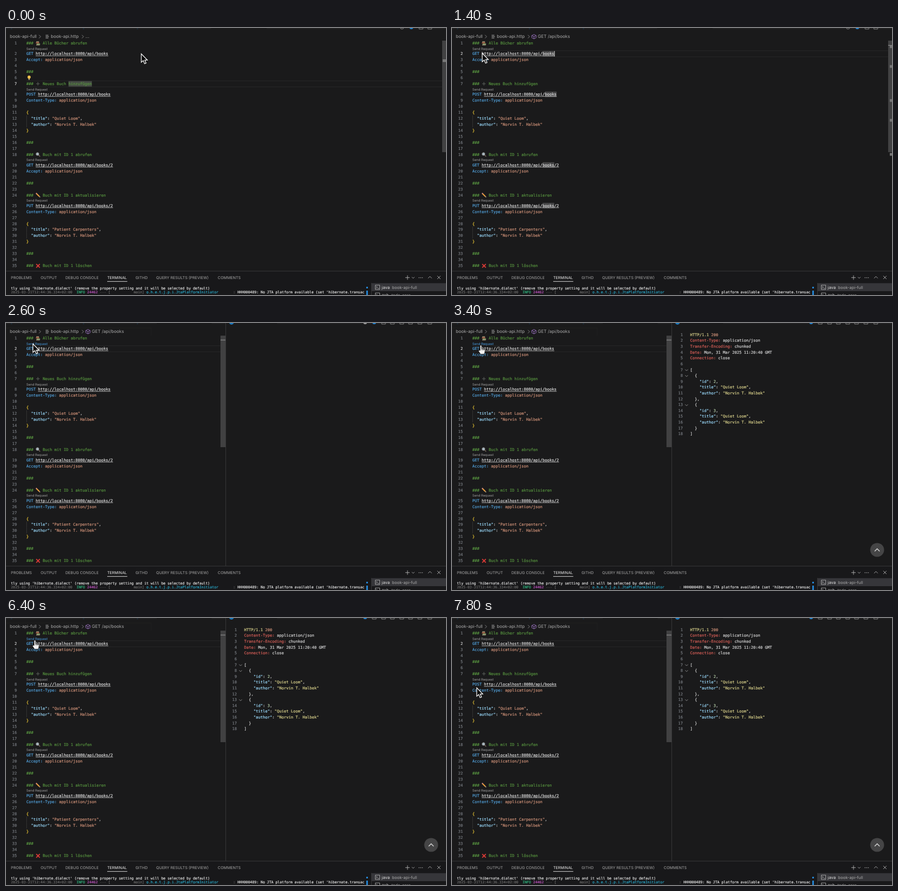
An HTML page for the animation above (8000 ms loop, 800 px wide and 486 px high).

```html
<!DOCTYPE html>
<html lang="de">
<head>
<meta charset="utf-8">
<title>REST client session</title>
<style>
  html, body { margin: 0; width: 100%; height: 100%; overflow: hidden; background: #1a1a1b; }
  svg { display: block; width: 100vw; height: 100vh; }
  text { white-space: pre; text-rendering: geometricPrecision; stroke-width: 0.2px; }
  .mono { font-family: "DejaVu Sans Mono", monospace; font-size: 7.07px; }
  .term { font-family: "DejaVu Sans Mono", monospace; font-size: 6.4px; }
  .ui { font-family: Inter, sans-serif; }
</style>
</head>
<body>
<svg id="stage" viewBox="0 0 800 486"></svg>
<script>
const LOOP = 8000, STEP = 200;
const CLICK = 400, HOVER = 2000, SPLIT = 2600, RESPONSE = 3000, LEAVE = 6800;
const CHAR = 4.257, LEFT = 37;
const C = {
  comment: '#56923f', blue: '#519fd8', url: '#dcdcdc', string: '#ce9178', key: '#9cdcfe',
  brace: '#f5cf35', plain: '#d4d4d4', dim: '#777b80', header: '#d75f58', reply: '#d8d08a', number: '#b5cea8'
};
const stage = document.getElementById('stage');

function add(parent, name, attrs = {}, content) {
  const el = document.createElementNS('http://www.w3.org/2000/svg', name);
  for (const key in attrs) el.setAttribute(key, attrs[key]);
  if (content !== undefined) el.textContent = content;
  parent.append(el);
  return el;
}
const group = (parent = stage) => add(parent, 'g');
const rect = (parent, x, y, width, height, fill) => add(parent, 'rect', { x, y, width, height, fill });
const line = (parent, d, stroke = '#c5c5c5', width = 0.8) =>
  add(parent, 'path', { d, stroke, 'stroke-width': width, fill: 'none' });
const dot = (parent, cx, cy, r, fill) => add(parent, 'circle', { cx, cy, r, fill });
const label = (parent, x, y, size, fill, content) =>
  add(parent, 'text', { x, y: y + size * 0.36, class: 'ui', 'font-size': size, fill }, content);

// Text on a fixed grid, from [colour, string] pieces; y is the middle of the capitals.
// The thin stroke gives the glyphs their slightly heavy look.
function rich(parent, x, y, pieces, cls = 'mono', anchor = 'start') {
  const el = add(parent, 'text', { x, y: y + 2.6, class: cls, 'text-anchor': anchor });
  for (const [fill, part] of pieces) add(el, 'tspan', { fill, stroke: fill }, part);
  return el;
}

function colourJson(source, stringColour, braceColour) {
  const pair = source.match(/^(\s*)("\w+")(: )(\d+|".*?")(,?)$/);
  if (!pair) return [[braceColour, source]];
  const [, indent, key, colon, value, comma] = pair;
  return [[C.plain, indent], [C.key, key], [C.plain, colon],
    [value[0] === '"' ? stringColour : C.number, value], [C.plain, comma]];
}

function colourRequest(source) {
  if (source.startsWith('#')) return [[C.comment, source]];
  const verb = source.match(/^([A-Z]+ )(http.*)$/);
  if (verb) return [[C.blue, verb[1]], [C.url, verb[2]]];
  const header = source.match(/^([\w-]+:)( .*)$/);
  if (header) return [[C.blue, header[1]], [C.string, header[2]]];
  return colourJson(source, C.string, C.brace);
}

const requests = `###    Alle Bücher abrufen
GET http://localhost:8080/api/books
Accept: application/json

###

###    Neues Buch hinzufügen
POST http://localhost:8080/api/books
Content-Type: application/json

{
  "title": "Quiet Loom",
  "author": "Norvin T. Halbek"
}

###

###    Buch mit ID 1 abrufen
GET http://localhost:8080/api/books/2
Accept: application/json

###

###    Buch mit ID 1 aktualisieren
PUT http://localhost:8080/api/books/2
Content-Type: application/json

{
  "title": "Patient Carpenters",
  "author": "Norvin T. Halbek"
}

###

###    Buch mit ID 1 löschen`.split('\n');

const reply = `HTTP/1.1 200
Content-Type: application/json
Transfer-Encoding: chunked
Date: Mon, 31 Mar 2025 11:20:40 GMT
Connection: close

[
  {
    "id": 2,
    "title": "Quiet Loom",
    "author": "Norvin T. Halbek"
  },
  {
    "id": 3,
    "title": "Quiet Loom",
    "author": "Norvin T. Halbek"
  }
]`.split('\n');

// Small pictures in an 8 by 8 box.
const icons = {
  1(g) {
    rect(g, 1, 0.5, 5, 2, '#8f8064'); rect(g, 0.5, 2.7, 6, 2, '#b5654a');
    rect(g, 2, 4.7, 6, 1.6, '#6c9a62'); rect(g, 1, 6.3, 6.5, 1.5, '#b9ad8e');
  },
  7(g) { line(g, 'M4 1V7M1 4H7', '#4c4f4c', 1.5); },
  18(g) {
    line(g, 'M5 5L8 8', '#77685c', 1.4);
    add(g, 'circle', { cx: 3.3, cy: 3.3, r: 2.6, fill: '#a9bac2', stroke: '#858585' });
  },
  24(g) {
    line(g, 'M1.5 1.5L6.5 6.5', '#e39a3b', 2.2);
    line(g, 'M.6 .6L1.8 1.8', '#d98d8d', 2); line(g, 'M6.5 6.5L8 8', '#d8c39c', 1.2);
  },
  35(g) { line(g, 'M1 1L7.5 7.5M7.5 1L1 7.5', '#dc3b36', 1.8); }
};

// Editor
const before = group(), after = group(), editor = group();
const lineY = [], numbers = [], lenses = [];
let y = 27.6;
requests.forEach((source, i) => {
  const n = i + 1;
  if (/^(GET|POST|PUT)/.test(source)) {
    y += 8.17;
    lenses.push(label(editor, LEFT, y - 8.9, 5.9, '#a2a2a2', 'Send Request'));
    const start = LEFT + (source.indexOf(' ') + 1) * CHAR;
    line(editor, `M${start} ${y + 4}H${LEFT + source.length * CHAR}`, '#c8c8c8', 0.8);
  }
  lineY[n] = y;
  numbers[n] = rich(editor, 19.8, y, [[C.dim, String(n)]], 'mono', 'end');
  rich(editor, LEFT, y, colourRequest(source));
  if (source.startsWith('  ')) line(editor, `M37.5 ${y - 5.5}v11`, '#444', 0.6);
  if (icons[n]) icons[n](add(editor, 'g', { transform: `translate(54 ${y - 4})` }));
  y += 10.95;
});

const activeLine = (g, n) => line(g, `M37 ${lineY[n] - 5.3}H793M37 ${lineY[n] + 5.7}H793`, '#272728', 1);
activeLine(before, 7);
rect(before, LEFT + 18 * CHAR, lineY[7] - 4.8, 10 * CHAR, 10, '#454a44');
dot(before, 42, lineY[6] - 1.1, 2.8, '#f3c34b');
rect(before, 40.9, lineY[6] + 1.7, 2.2, 2.2, '#c9b68a');
activeLine(after, 2);
const matches = group(after);
for (const n of [2, 8, 19, 25]) {
  const col = requests[n - 1].indexOf('books');
  rect(matches, LEFT + col * CHAR, lineY[n] - 4.8, 5 * CHAR, 10, '#474748');
}
const caret = rect(editor, 185.9, lineY[2] - 4.8, 0.9, 10, '#d8d8d8');

// Lower edge of the tab strip, open under the active tab, and breadcrumbs
const stripEdge = (parent, from, to) => rect(parent, from, 0, to - from, 1.2, '#252526');
for (const x of [10, 141, 239]) dot(stage, x, -1.8, 3.2, '#1c79bd');
label(stage, 7, 15.6, 8, '#a9a9a9', 'book-api-full');
line(stage, 'M60 12.7L63 15.7L60 18.7M138 12.7L141 15.7L138 18.7', '#999');
line(stage, 'M72 13.2H77M72 15.7H78M72 18.2H77', '#bbb', 0.9);
label(stage, 81.5, 15.6, 8, '#a9a9a9', 'book-api.http');
const crumbDots = label(stage, 144.5, 15.6, 8, '#a9a9a9', '…');
const crumb = group();
line(crumb, 'M149 11.7L153 13.7V17.7L149 19.7L145 17.7V13.7ZM145 13.7L149 15.7L153 13.7M149 15.7V19.7', '#a77bd0');
label(crumb, 156, 15.6, 8, '#a9a9a9', 'GET /api/books');

// One wide editor
const wide = group();
stripEdge(wide, 0, 373);
stripEdge(wide, 474, 800);
add(wide, 'circle', { cx: 720, cy: -1.2, r: 3.2, fill: 'none', stroke: '#999', 'stroke-width': 0.8 });
dot(wide, 737, -1.2, 3.5, '#2583cf');
for (const x of [751, 767]) line(wide, `M${x} 0V2H${x + 7}V0`, '#999');
rect(wide, 793, 23, 7, 203, '#414142');
const markBefore = rect(wide, 794, 57, 6, 5, '#777');
const marksAfter = group(wide);
rect(marksAfter, 793, 31, 7, 1, '#999');
for (const my of [34, 70, 132, 168, 230]) rect(marksAfter, 796, my - 2.5, 4, 5, '#777');

// Editor and response side by side
const split = group();
rect(split, 399, 0, 401, 442, '#1a1a1b');
stripEdge(split, 0, 274);
stripEdge(split, 374, 399);
stripEdge(split, 493, 800);
line(split, 'M0 9H264V23', '#222223', 0.8);
rect(split, 390, 23, 9, 203, '#414142');
rect(split, 390, 30.5, 9, 1, '#999');
line(split, 'M399.5 0V442', '#363637', 1);
dot(split, 410, -1.6, 4.5, '#1c79bd');
const toolbar = dot(split, 653, -1.2, 3.5, '#999');
const toolbarNext = dot(split, 669.5, -1.2, 3.5, '#2583cf');
for (const x of [683, 699, 716, 732, 749, 767]) line(split, `M${x} 0V2H${x + 7}V0`, '#999');

const response = group();
line(response, 'M666 0V2H673V0', '#999');
reply.forEach((source, i) => {
  const ry = 21.2 + i * 10.62, n = i + 1;
  rich(response, 419.8, ry, [[C.dim, String(n)]], 'mono', 'end');
  const header = source.match(/^([\w-]+:)( .*)$/);
  rich(response, 433, ry, n === 1 ? [[C.reply, 'HTTP/1.1'], [C.string, ' 200']]
    : header ? [[C.header, header[1]], [C.plain, header[2]]]
    : colourJson(source, C.reply, C.plain));
  if ([7, 8, 13].includes(n)) line(response, `M424 ${ry - 0.4}l2.5 2.5 2.5-2.5`, '#aaa');
});
dot(response, 773, 413, 12.6, '#454546');
line(response, 'M768.5 415.5L773 411L777.5 415.5', '#ddd', 1.3);

// Panel
rect(stage, 0, 442, 800, 44, '#18181a');
line(stage, 'M0 442.5H800', '#363637', 1);
const tabs = { PROBLEMS: 9, OUTPUT: 63, 'DEBUG CONSOLE': 108, TERMINAL: 184, GITHD: 235.5,
  'QUERY RESULTS (PREVIEW)': 273, COMMENTS: 385 };
for (const name in tabs) label(stage, tabs[name], 454.5, 7.05, name === 'TERMINAL' ? '#eee' : '#a6a6a6', name);
line(stage, 'M184 461.3H220.5', '#d8d8d8', 1);
line(stage, 'M726 454.3H734M730 450.3V458.3M738 453.3L740.3 455.6L742.6 453.3' +
  'M767.5 455.5L770.8 452.2L774.1 455.5M784.2 451.2L790 457M790 451.2L784.2 457');
for (const x of [751, 754, 757]) dot(stage, x, 454.5, 0.7, '#c5c5c5');
rich(stage, 9, 473.4, [['#dedede',
  "tly using 'hibernate.dialect' (remove the property setting and it will be selected by default)"]], 'term');
rich(stage, 9, 480.5, [
  ['#686868', '2025-03-31T12:44:36.334+02:00  '], ['#2fb980', 'INFO '], ['#b850b8', '24462 '],
  ['#686868', '--- [           main] '], ['#27a5c5', 'o.h.e.t.j.p.i.JtaPlatformInitiator      '],
  ['#686868', ' : '], ['#e2e2e2', "HHH000489: No JTA platform available (set 'hibernate.transac"]
], 'term');
rect(stage, 655, 471, 3, 3, '#2583cf');
rect(stage, 655, 478, 3, 8, '#2583cf');
line(stage, 'M664.5 464V486', '#363637', 1);
rect(stage, 665, 464.5, 135, 14.5, '#36363a');
const shellIcon = sy => line(stage, `M671.5 ${sy - 4}h8v8h-8zM673 ${sy - 2}l2 2-2 2M676 ${sy + 2}h2`, '#bbb', 0.8);
shellIcon(472); shellIcon(486.2);
label(stage, 683, 472, 7.8, '#e2e2e2', 'java');
label(stage, 702, 472.2, 7.4, '#aaa', 'book-api-full');
label(stage, 683, 486.2, 7.8, '#c5c5c5', 'zsh');
label(stage, 701, 486.4, 7.4, '#999', 'todo-core');

// Pointer
const arrow = add(stage, 'path', {
  d: 'M0 0V15.5L3.6 12.3L6 18L8.7 16.9L6.3 11.3H11Z', fill: '#080808', stroke: '#fff', 'stroke-width': 1.2
});
const hand = add(stage, 'path', {
  d: 'M-1.4 9V.8a1.4 1.4 0 0 1 2.8 0V5.5l5 1.2q1.5.4 1.3 2l-.6 3.8-1.2 3.2h-6.4L-4 10.5q-.6-1.7 1-1.8z' +
    'M1.4 5.5V8.5M3.4 6V8.8M5.4 6.5V9',
  fill: '#f2f2f2', stroke: '#161616', 'stroke-width': 0.7
});
const path = [[0, 246, 47], [CLICK, 246, 47], [1200, 55, 46], [1400, 55, 46], [HOVER, 49, 38],
  [SPLIT, 49, 38], [2800, 52.5, 41], [LEAVE, 52.5, 41], [7600, 45, 127], [LOOP, 45, 127]];

function pointerAt(t) {
  const i = path.findIndex(p => p[0] > t);
  const [t0, x0, y0] = path[i - 1], [t1, x1, y1] = path[i];
  const u = (t - t0) / (t1 - t0), k = u * u * (3 - 2 * u);
  return [x0 + (x1 - x0) * k, y0 + (y1 - y0) * k];
}

const show = (el, on) => el.setAttribute('visibility', on ? 'inherit' : 'hidden');
function tint(n, on) {
  for (const attr of ['fill', 'stroke']) numbers[n].firstChild.setAttribute(attr, on ? '#d0d0d0' : C.dim);
}

function draw(t) {
  const clicked = t >= CLICK, isSplit = t >= SPLIT, loaded = t >= RESPONSE;
  const hovering = t >= HOVER && t <= LEAVE;
  const useHand = hovering && (t < SPLIT || t >= SPLIT + STEP);
  show(before, !clicked); show(after, clicked);
  show(crumbDots, !clicked); show(crumb, clicked);
  show(markBefore, !clicked && !isSplit); show(marksAfter, clicked && !isSplit);
  show(matches, clicked && !isSplit);
  show(caret, clicked && !isSplit && (t - CLICK) % 1000 < 500);
  tint(7, !clicked); tint(2, clicked);
  show(wide, !isSplit); show(split, isSplit); show(response, loaded);
  toolbar.setAttribute('fill', loaded ? '#2583cf' : '#999');
  show(toolbarNext, isSplit && !loaded);
  lenses[0].setAttribute('fill', hovering ? '#4aa0e8' : '#a2a2a2');
  show(arrow, !useHand); show(hand, useHand);
  const [x, y] = pointerAt(t);
  for (const el of [arrow, hand]) el.setAttribute('transform', `translate(${x} ${y})`);
}

const origin = performance.now();
function tick() {
  const t = (performance.now() - origin) % LOOP;
  draw(Math.floor(t / STEP) * STEP);
  requestAnimationFrame(tick);
}
tick();
</script>
</body>
</html>
```
